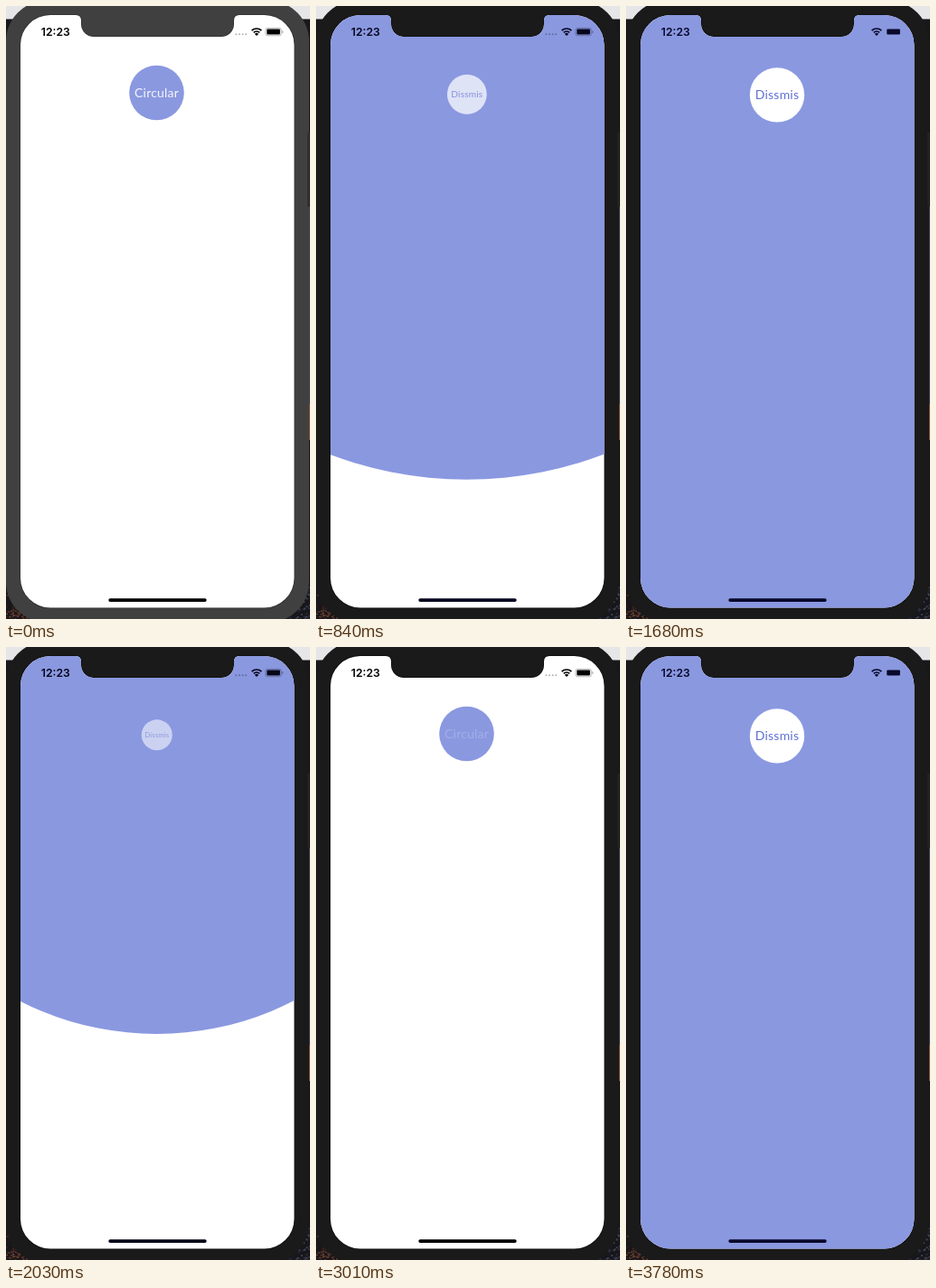
Write an HTML page with a canvas that moves like this. It is 336x678 px and loops after 4.55 s.

```html
<!DOCTYPE html>
<html lang="en">
<head>
<meta charset="utf-8">
<title>Circular transition</title>
<style>
  html, body { margin: 0; width: 100%; height: 100%; overflow: hidden; background: #15161c; }
  canvas { display: block; width: 336px; height: 678px; }
</style>
</head>
<body>
<canvas id="stage"></canvas>
<script>
const W = 336, H = 678, LOOP = 4550, STEP = 70;
const LAVENDER = '#8a98e0';
const START = { x: 166.5, y: 96 };    // centre of the growing circle
const FULL_RADIUS = 590, DURATION = 384;
const canvas = document.getElementById('stage');
const ctx = canvas.getContext('2d');
const ratio = window.devicePixelRatio || 1;
canvas.width = W * ratio;
canvas.height = H * ratio;
ctx.scale(ratio, ratio);

const screenShape = new Path2D(
  'M49 10H77Q83 10 83 16V20A14 14 0 0 0 97 34H238A14 14 0 0 0 252 20V16Q252 10 258 10' +
  'H285.5A33 33 0 0 1 318.5 43V632.5A33 33 0 0 1 285.5 665.5H49A33 33 0 0 1 16 632.5V43A33 33 0 0 1 49 10Z');

// cubic-bezier(.42, 0, .58, 1)
function easeInOut(x) {
  if (x <= 0) return 0;
  if (x >= 1) return 1;
  let low = 0, high = 1, u;
  for (let i = 0; i < 24; i++) {
    u = (low + high) / 2;
    const bx = 1.26 * u * (1 - u) ** 2 + 1.74 * u * u * (1 - u) + u ** 3;
    if (bx < x) low = u; else high = u;
  }
  return u * u * (3 - 2 * u);
}

// 0 = first screen, 1 = fully presented second screen
function presented(t) {
  const ramp = begin => easeInOut((t - begin) / DURATION);
  if (t < 700) return 0;
  if (t < 1820) return ramp(595.5);
  if (t < 3150) return 1 - ramp(1852);
  return ramp(3045.5);
}

function seededRandom(seed) {
  return () => (seed = seed * 16807 % 2147483647) / 2147483647;
}

function rect(x, y, w, h, color) {
  ctx.fillStyle = color;
  ctx.fillRect(x, y, w, h);
}

function roundRect(x, y, w, h, r, color) {
  ctx.beginPath();
  ctx.roundRect(x, y, w, h, r);
  ctx.fillStyle = color;
  ctx.fill();
}

function disc(x, y, r, color) {
  ctx.beginPath();
  ctx.arc(x, y, r, 0, Math.PI * 2);
  ctx.fillStyle = color;
  ctx.fill();
}

function label(text, x, y, font, color) {
  ctx.font = font;
  ctx.textAlign = 'center';
  ctx.fillStyle = color;
  ctx.fillText(text, x, y);
}

// Speckled corner of the wallpaper behind the device
function drawWallpaperCorner(x, hue, saturation) {
  const random = seededRandom(x + 7);
  for (let i = 0; i < 160; i++) {
    rect(x + random() * 30, 640 + random() * 38, 2, 1.5,
      `hsl(${hue}, ${saturation}%, ${8 + random() * 28}%)`);
  }
}

function drawDesktop() {
  rect(0, 0, W, H, '#17171c');
  rect(0, 0, W, 14.5, '#e6e6e8');
  rect(335, 222, 1, 218, '#45465f');
  rect(335, 440, 1, 40, '#8a583c');
  drawWallpaperCorner(0, 16, 40);
  drawWallpaperCorner(306, 235, 14);
}

function drawBezel(active) {
  roundRect(0, -6, 335, 688, 45, active ? '#1a1a1a' : '#404040');
  rect(333, 140, 3, 82, active ? '#222' : '#303030');
  ctx.strokeStyle = active ? '#101010' : '#303030';
  ctx.lineWidth = 1.6;
  ctx.stroke(screenShape);
}

function drawStatus(p) {
  const ink = `rgb(${8 * p}, ${8 * p}, ${42 * p})`;
  label('12:23', 54.8, 33.2, '600 12.2px Inter, sans-serif', ink);

  if (p < 1) {
    for (let i = 0; i < 4; i++) disc(254.4 + i * 3.6, 31.2, 1, 'rgba(0,0,0,.3)');
    ctx.beginPath();
    ctx.roundRect(286.9, 24.4, 17.4, 8.4, 2.2);
    ctx.strokeStyle = 'rgba(0,0,0,.35)';
    ctx.lineWidth = .8;
    ctx.stroke();
    rect(305.3, 27.2, 1, 2.8, 'rgba(0,0,0,.35)');
  }
  roundRect(288.3, 25.6, 14.6, 6, 1, ink);

  ctx.strokeStyle = ink;
  ctx.lineWidth = 1.7;
  for (const r of [4.6, 7.6]) {
    ctx.beginPath();
    ctx.arc(277, 32.6, r, -Math.PI * .75, -Math.PI * .25);
    ctx.stroke();
  }
  ctx.beginPath();
  ctx.moveTo(277, 33);
  ctx.arc(277, 33, 3, -Math.PI * .75, -Math.PI * .25);
  ctx.fillStyle = ink;
  ctx.fill();

  roundRect(113.3, 655.2, 108.4, 3.8, 1.9, ink);
}

function drawButton(text, r, fill, ink) {
  disc(0, 0, r, fill);
  ctx.letterSpacing = '.2px';
  label(text, 0, 4.8, '400 14px Lato, sans-serif', ink);
  ctx.letterSpacing = '0px';
}

function draw(t) {
  const p = presented(t);
  const openPressed = (t >= 560 && t < 700) || (t >= 3010 && t < 3150);
  const closePressed = t >= 1820 && t < 1890;

  drawDesktop();
  drawBezel(t >= 490);

  ctx.save();
  ctx.clip(screenShape);
  rect(0, 0, W, H, '#fff');

  ctx.save();
  ctx.translate(START.x, START.y);
  drawButton('Circular', 30.3, LAVENDER, openPressed ? 'rgba(255,255,255,.22)' : '#f4f5fc');
  if (p > 0) {
    disc(0, 0, FULL_RADIUS * p, LAVENDER);
    ctx.translate(.5 * p, 2.4 * p);
    ctx.scale(p, p);
    ctx.globalAlpha = p;
    drawButton('Dissmis', 30.2, '#fff', closePressed ? 'rgba(92,106,208,.25)' : '#6271d3');
  }
  ctx.restore();

  drawStatus(p);
  ctx.restore();
}

function tick(now) {
  const t = now % LOOP;
  draw(Math.floor(t / STEP) * STEP);
  requestAnimationFrame(tick);
}
requestAnimationFrame(tick);
</script>
</body>
</html>
```
